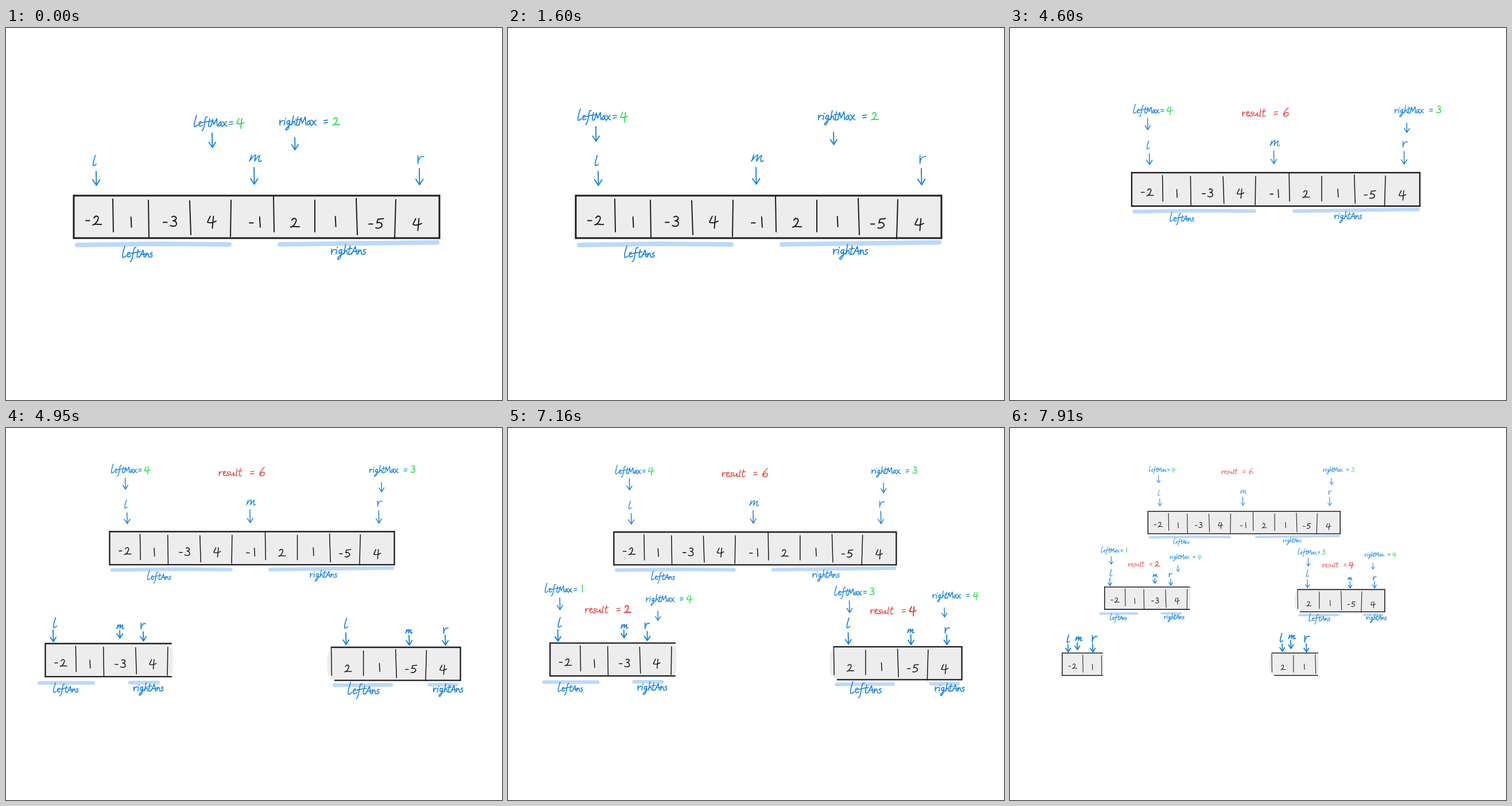
An HTML page with a canvas that plays this animation: 864 px wide and 648 px high, repeating every 8000 ms.

```html
<!DOCTYPE html>
<html lang="en">
<head>
<meta charset="utf-8">
<title>Maximum subarray by divide and conquer</title>
<style>
html, body { margin: 0; width: 100%; height: 100%; overflow: hidden; background: #fff; }
canvas { display: block; width: 864px; height: 648px; }
</style>
</head>
<body>
<canvas id="stage" width="864" height="648" role="img"
  aria-label="Array -2 1 -3 4 -1 2 1 -5 4, leftMax, rightMax, leftAns, rightAns, result"></canvas>
<script>
const LOOP = 8000;
const BLUE = '#1780de', GREEN = '#2fdc55', RED = '#e63838';
const INK = '#1d1d22', CELL = '#ededed', BAND = '#bcd9fa';
const ctx = document.getElementById('stage').getContext('2d');
ctx.lineCap = ctx.lineJoin = 'round';

// Pen strokes: [advance, path], baseline at y = 0. '|' is a short l.
const letters = {
  l: [8, 'M5-19C3-12 0-4 1 0C2 2 4 0 7-2'],
  e: [7, 'M1-4C5-4 7-8 4-8C1-8 0-1 3 0C5 0 6-1 7-2'],
  f: [9, 'M9-16C5-18 5-10 3 0C2 5 1 8-1 8M0-6L9-8'],
  t: [6, 'M4-13C3-8 1-2 2 0C3 1 5 0 6-1M0-8L7-9'],
  M: [12, 'M0 0L3-12L5-3L10-13L11 0'],
  a: [8, 'M6-7C2-8 0-1 2 0C4 0 6-5 6-7C5-3 6 0 8 0'],
  x: [8, 'M0-8C3-7 4 0 8 0M7-8L0 1'],
  r: [7, 'M1-8L1 0C1-5 4-8 7-7'],
  i: [4, 'M2-7L1 0M3-11L3-10']
};
const moreLetters = {
  g: [8, 'M6-7C1-8 0-1 3-1C5-2 6-5 6-7C6 0 4 8 0 8C-2 6 4 1 8-1'],
  h: [7, 'M4-15L1 0C3-6 6-8 6-4C6-1 6 0 8 0'],
  A: [10, 'M0 0L6-12L8 0M2-4L9-5'],
  n: [7, 'M1-7L0 0C2-6 5-9 5-4L6 0'],
  s: [7, 'M5-7C1-8 1-4 3-4C6-3 5 1 0 0'],
  u: [8, 'M0-7C-1 1 3 1 6-6L6 0L8-1'],
  m: [21, 'M4-11C3-7 2-3 0 0C4-5 8-11 11-11L9 0C12-5 16-10 18-10C16-4 16 0 17 1L21-1'],
  '|': [6, 'M4-12L2 0L4 0']
};
const digits = {
  ' ': [4, ''],
  '=': [8, 'M0-7L6-8M0-3L6-4'],
  '-': [13, 'M0-8L7-8'],
  1: [8, 'M6-19L7 0'],
  2: [16, 'M2-13C6-19 13-16 9-9C7-4 3 0 0 0C6-3 10 0 16-1'],
  3: [13, 'M3-18C8-21 13-17 10-13C8-11 5-11 5-11C13-11 13-2 8-1C4 0 2-1 0-2'],
  4: [16, 'M5-17C3-12 1-9 0-6C4-4 11-5 16-8M11-17L9 5'],
  5: [14, 'M4-17L2-10C9-13 14-7 10-3C7 0 3 0 0-1M4-17L14-18'],
  6: [10, 'M9-15C4-11-1-3 1-1C4 2 10-1 9-5C7-8 3-6 2-3']
};
const glyphs = {};
for (const [ch, [adv, d]] of Object.entries({ ...letters, ...moreLetters, ...digits }))
  glyphs[ch] = { adv, path: new Path2D(d) };

const dividers = [
  [186, 298, 187, 355], [248, 300, 249, 364], [320, 301, 322, 360], [392, 300, 391, 363],
  [466, 293, 467, 355], [538, 300, 538, 355], [610, 297, 612, 360], [679, 299, 677, 367]
];
const cells = [
  ['-2', 139, 343], ['1', 212, 347], ['-3', 274, 346], ['4', 351, 344], ['-1', 424, 347],
  ['2', 496, 347], ['1', 568, 346], ['-5', 632, 349], ['4', 709, 348]
];

// Pointer rows: letter, x, baseline, size, arrow x, arrow top, arrow tip
const mainPointers = [['l', 151, 239, .9, 157, 250, 274], ['m', 424, 232, 1, 432, 243, 272], ['r', 716, 236, 1.7, 720, 245, 273]];
const leftPointers = [['l', 82, 347, .88, 82, 352, 372], ['m', 193, 349, .58, 198, 353, 366], ['r', 234, 350, 1.3, 239, 355, 371]];
const rightPointers = [['l', 589, 348, .88, 592, 357, 377], ['m', 696, 357, .55, 702, 361, 378], ['r', 761, 358, 1.3, 765, 361, 378]];
const leftLeaf = [['l', 99, 373, .65, 101, 377, 390], ['m', 114, 370, .55, 117, 374, 386], ['r', 142, 373, 1.4, 144, 376, 390]];
const rightLeaf = [['l', 470, 372, .74, 474, 376, 389], ['m', 485, 367, .58, 489, 370, 384], ['r', 512, 373, 1.4, 516, 376, 390]];

// Motion tables: time, then values
const mainView = [[4450, 1, 0, 0], [4600, .788, 119, 21.9], [4750, .7787, 88.6, -46.9]];
const treeView = [[7110, 1, 0, 0], [7160, .992, 5.3, 2.2], [7500, .675, 118.5, 23.5]];
const leftMaxMove = [[0, 327, 171], [250, 253, 158], [400, 253, 158], [600, 186, 157], [800, 186, 157], [950, 121, 160]];
const rightMaxMove = [[1000, 476, 169], [1350, 540, 160], [1950, 540, 160], [2250, 618, 159], [2450, 618, 159], [2900, 699, 160]];
const leftChildMove = [[5190, 120, 286], [5450, 59, 286]];
const rightChildMove = [[5640, 626, 295], [5990, 567.5, 291]];

function tween(t, steps) {
  let i = 0;
  while (i < steps.length - 1 && t >= steps[i + 1][0]) i++;
  const a = steps[i], b = steps[i + 1];
  if (!b || t <= a[0]) return a.slice(1);
  const p = (t - a[0]) / (b[0] - a[0]), e = p * p * (3 - 2 * p);
  return a.slice(1).map((v, n) => v + (b[n + 1] - v) * e);
}

function at(x, y, k, fn) {
  ctx.save();
  ctx.translate(x, y);
  ctx.scale(k, k);
  fn();
  ctx.restore();
}

function line(pts, color, width) {
  ctx.strokeStyle = color;
  ctx.lineWidth = width;
  ctx.beginPath();
  for (let i = 0; i < pts.length; i += 2) ctx.lineTo(pts[i], pts[i + 1]);
  ctx.stroke();
}

function write(text, x, y, size, color, width = 1.7) {
  at(x, y, size, () => {
    ctx.strokeStyle = color;
    ctx.lineWidth = width / size;
    for (const ch of text) {
      ctx.stroke(glyphs[ch].path);
      ctx.translate(glyphs[ch].adv, 0);
    }
  });
}

function arrow(x, top, tip, h = 5.5, width = 1.9) {
  line([x, top, x + .5, tip], BLUE, width);
  line([x - h, tip - h * 1.6, x + .5, tip, x + h + .5, tip - h * 1.6], BLUE, width);
}

function pointers(rows, h, width) {
  for (const [ch, x, y, size, ax, top, tip] of rows) {
    write(ch, x, y, size, BLUE, width);
    arrow(ax, top, tip, h, width);
  }
}

// The array strip between a and b; an open end has no border
function bar(a, b, openL, openR) {
  const l = openL ? a - 8 : a, r = openR ? b + 2 : b;
  const rl = openL ? 22 : 0, rr = openR ? 16 : 0;
  ctx.fillStyle = CELL;
  ctx.beginPath();
  ctx.roundRect(l, 292, r - l, 74, [rl, rr, rr, rl]);
  ctx.fill();
  ctx.lineCap = 'butt';
  line([a, 292, b, 292], INK, 3);
  line([openL ? a + 8 : a, 366, b, 366], INK, 3);
  if (!openL) line([a, 290.5, a, 367.5], INK, 3);
  if (!openR) line([b, 290.5, b, 367.5], INK, 3);
  ctx.lineCap = 'round';
  for (const d of dividers) if (d[0] >= a - 2 && d[0] < b) line(d, INK, 2);
  for (const [text, x, y] of cells) if (x > a && x < b - 5) write(text, x, y, .94, INK, 2);
}

function leftMax([x, y], k, value) {
  at(x, y, k, () => {
    write('leftMax =', 0, 0, 1, BLUE);
    write(value, 75, 0, .78, GREEN, 1.9);
    arrow(32, 12, 37);
  });
}

function rightMax([x, y], k, value) {
  at(x, y, k, () => {
    write('rightMax   =', 0, 0, 1.08, BLUE);
    write(value, 93, 0, .78, GREEN, 1.9);
    arrow(27, 22, 43);
  });
}

function result(x, y, k, value, p, bold) {
  if (p <= 0) return;
  at(x, y, k, () => {
    ctx.beginPath();
    ctx.rect(-3, -40, 3 + 112 * Math.min(p, 1), 60);
    ctx.clip();
    write('resu|t    =', 0, 0, 1.25, RED);
    write(value, bold ? 88 : 91, 0, bold ? .95 : 1.25, RED, bold ? 2.5 : 1.8);
  });
}

function mainArray(t) {
  bar(118, 755);
  line([124, 378, 260, 376, 389, 377], BAND, 8);
  line([477, 377, 620, 375, 751, 373.5], BAND, 8);
  write('leftAns', 202, 399, 1.02, BLUE);
  write('rightAns', 566, 394, 1.12, BLUE);
  pointers(mainPointers, 6);
  leftMax(tween(t, leftMaxMove), 1, '4');
  rightMax(tween(t, rightMaxMove), 1, t < 1750 ? '2' : t < 1800 ? '' : '3');
  result(362, 167, 1, '6', (t - 3115) / 1200);
}

function children(t) {
  const k = .7787;
  if (t >= 4800) at(-23.4, 148.1, k, () => bar(118, 401, false, true));
  if (t >= 4850) at(203.7, 154.6, k, () => bar(465, 755, true, false));
  if (t >= 4900) {
    pointers(leftPointers, 4.8);
    pointers(rightPointers, 4.8);
  }
  if (t >= 4950) {
    line([58, 444, 152, 444], BAND, 6.5);
    line([216, 443.5, 265, 443.5], BAND, 6.5);
    line([572, 448, 671, 447.5], BAND, 6.5);
    line([738, 447, 785, 447], BAND, 6.5);
    write('leftAns', 82, 460, .84, BLUE, 1.5);
    write('rightAns', 222, 458, .96, BLUE, 1.6);
    write('leftAns', 595, 463, 1.06, BLUE, 1.6);
    write('rightAns', 744, 460, .96, BLUE, 1.6);
  }
  if (t >= 5000) {
    leftMax(tween(t, leftChildMove), .83, '1');
    rightMax([237, 302.5], .77, '4');
  }
  if (t >= 5050) {
    leftMax(tween(t, rightChildMove), .83, t < 6040 ? '1' : t < 6140 ? '' : '3');
    rightMax([740, 296.5], .77, '4');
  }
  result(130, 322, .78, '2', (t - 6300) / 320, true);
  result(631, 324, .78, '4', (t - 6620) / 320, true);
}

function leaves(t) {
  const k = .5256;
  if (t >= 7600) at(29, 238.6, k, () => bar(118, 253, false, true));
  if (t >= 7700) at(211, 238.6, k, () => bar(466, 620, true, true));
  if (t >= 7800) pointers(leftLeaf, 4, 1.8);
  if (t >= 7900) pointers(rightLeaf, 4, 1.8);
}

function draw(t) {
  ctx.fillStyle = '#fff';
  ctx.fillRect(0, 0, 864, 648);
  const [tk, tx, ty] = tween(t, treeView);
  at(tx, ty, tk, () => {
    const [k, x, y] = tween(t, mainView);
    at(x, y, k, () => mainArray(t));
    children(t);
  });
  leaves(t);
}

const start = performance.now();
function tick() {
  draw((performance.now() - start) % LOOP);
  requestAnimationFrame(tick);
}
tick();
</script>
</body>
</html>
```
